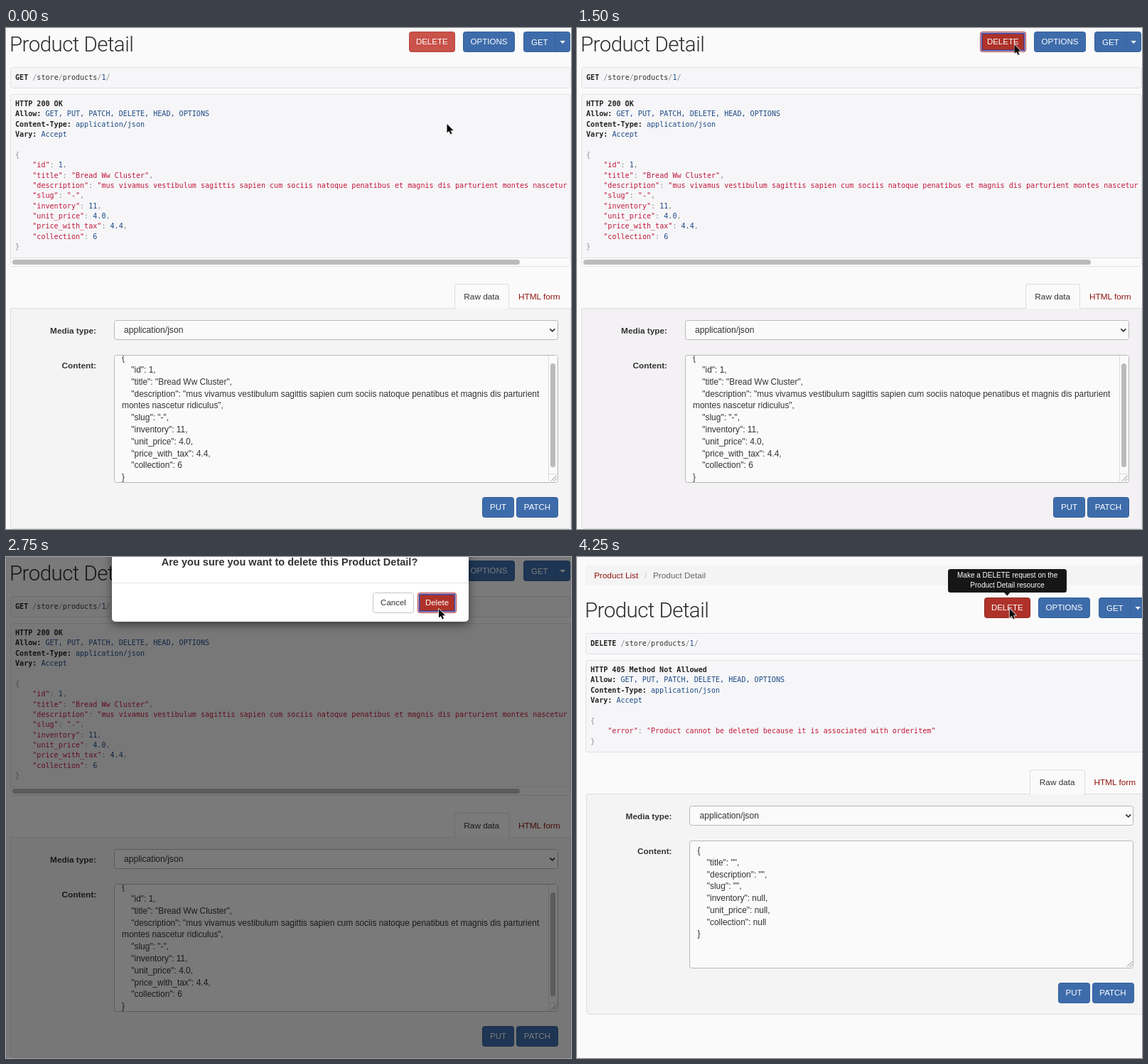
Animation of 795x705 px, one loop 5 s. Source, as an HTML page:

```html
<!DOCTYPE html>
<html lang="en">
<head>
<meta charset="utf-8">
<title>Product Detail</title>
<style>
  html, body { margin: 0; width: 100%; height: 100%; overflow: hidden; background: #fafafa; }
  #stage {
    position: relative; width: 795px; height: 705px; overflow: hidden; background: #fafafa;
    font: 11.8px "Liberation Sans", Arial, sans-serif; color: #333;
  }
  #stage div { position: absolute; box-sizing: border-box; white-space: pre; }
  #stage svg { position: absolute; left: 0; top: 0; overflow: visible; }
  .layer { left: 0; top: 0; width: 795px; height: 705px; }
  .title { font: 300 29.5px Roboto, "Liberation Sans", sans-serif; letter-spacing: -.55px; color: #2b2b2b; }
  .btn { border: 1px solid #34609b; border-radius: 3.5px; background: #3e6cab; color: #fff; font-size: 11.5px; text-align: center; }
  .red { border-color: #b5443d; background: #c9524a; }
  .hover { border-color: #8f2a22; background: #ae3229; }
  .plain { border-color: #c4c4c4; background: #fff; color: #333; }
  .pre { border: 1px solid #e0e0e6; border-radius: 3.5px; background: #f6f6f8; }
  .code { font: 10.09px/14.36px "DejaVu Sans Mono", monospace; color: #333; }
  .code b { color: #222; }
  .code i { font-style: normal; color: #8a8f90; }
  .code s { text-decoration: none; color: #c2183c; }
  .code u { text-decoration: none; color: #1f4a85; }
  .well { border: 1px solid #dedede; border-radius: 0 0 4px 4px; background: #f4f4f4; }
  .tab { border: 1px solid #ddd; border-bottom: 0; border-radius: 4px 4px 0 0; background: #fafafa; text-align: center; }
  .link { color: #8f1510; }
  .label { font-weight: bold; text-align: right; }
  .field { border: 1px solid #b8b8b8; border-radius: 3.5px; background: #fafafa; overflow: hidden; font-size: 12.1px; }
  .content { font-size: 11.95px; }
  .track { background: #fafafa; }
  .thumb { border-radius: 4px; background: #bbb; }
  .crumbs { border-radius: 3.5px; background: #f4f4f4; }
  .modal { border-radius: 5px; background: #fff; box-shadow: 0 4px 13px rgba(0,0,0,.5); }
  .question { font-size: 14.53px; font-weight: bold; text-align: center; }
  .tip { border-radius: 3.5px; background: #161616; color: #fff; font-size: 10px; text-align: center; }
</style>
</head>
<body>
<div id="stage"></div>
<script>
const LOOP = 5000;

const box = (cls, x, y, w, h, html = "", id = "") =>
  `<div class="${cls}" ${id && `id="${id}"`} style="left:${x}px;top:${y}px;width:${w}px;height:${h}px">${html}</div>`;

// One line of text, vertically centred on y.
const label = (cls, x, y, html, w = 400) =>
  `<div class="${cls}" style="left:${x}px;top:${y - 20}px;width:${w}px;line-height:40px">${html}</div>`;

const button = (cls, x, y, w, text, id) =>
  box("btn " + cls, x, y, w, 28.5, `<span style="line-height:27px">${text}</span>`, id);

const block = (cls, x, y, lineHeight, lines) =>
  `<div class="${cls}" style="left:${x}px;top:${y}px;line-height:${lineHeight}px">${lines.join("\n")}</div>`;

const paintJson = line => line.replace(/("[^"]*"?)|([\d.]+)|([{}:,])/g, (m, str, num) =>
  str ? `<s>${m}</s>` : num ? `<u>${m}</u>` : `<i>${m}</i>`);

const stroke = (d, color, width) => `<path d="${d}" fill="none" stroke="${color}" stroke-width="${width}"/>`;

function head({ verb, status, json, height, deleteId, deleteClass }) {
  const headers = [
    `<b>HTTP ${status}</b>`,
    "<b>Allow:</b> <u>GET, PUT, PATCH, DELETE, HEAD, OPTIONS</u>",
    "<b>Content-Type:</b> <u>application/json</u>",
    "<b>Vary:</b> <u>Accept</u>",
    ""
  ];
  return label("title", 5, 23, "Product Detail")
    + button(deleteClass, 567, 5, 64.5, "DELETE", deleteId)
    + button("", 643, 5, 73, "OPTIONS")
    + button("", 728, 5, 66, "")
    + label("", 739, 19.5, '<span style="color:#fff;font-size:11.5px">GET</span>')
    + `<svg>${stroke("M773 5.5V33.5", "#34609b", 1)}<path d="M779.5 18h7.4l-3.7 4z" fill="#fff"/></svg>`
    + box("pre", 6, 55, 788.5, 30)
    + block("code", 13, 62.6, 14.36, [`<b>${verb}</b> <i>/</i>store<i>/</i>products<i>/</i><u>1</u><i>/</i>`])
    + box("pre", 6, 93, 788.5, height)
    + block("code", 13, 100, 14.36, headers.concat(json.map(paintJson)));
}

function form({ wellId, textTop, text, scroll }) {
  const bar = scroll
    ? box("track", 763, 461, 12.5, 177) + box("thumb", 766, 472, 7, 146)
      + `<svg>${stroke("M763.5 461V638.5M763.5 627.5H776", "#dcdcdc", 1)}</svg>`
    : "";
  return box("well", 6, 394, 788.5, 311, "", wellId)
    + box("tab", 630.5, 359.5, 77.5, 35.5, '<span style="line-height:35px">Raw data</span>')
    + label("link", 721, 377.5, "HTML form")
    + label("label", 27, 425.5, "Media type:", 100)
    + label("label", 27, 475, "Content:", 100)
    + box("field", 151.5, 411, 625, 28, '<span style="line-height:27px;margin-left:13.5px">application/json</span>')
    + box("field", 151.5, 460, 625, 179.5, block("content", 10.5, textTop, 16.76, text))
    + bar
    + `<svg>${stroke("M765.3 423.4l3.5 3.5 3.5-3.5", "#333", 1.7)}
        ${stroke("M767 637.5l7.5-7.5M771 637.5l3.5-3.5", "#777", .9)}</svg>`
    + button("", 670, 660, 45, "PUT")
    + button("", 718, 660, 59, "PATCH");
}

const group = (x, y, html) => box("", x, y, 795, 705, html);

const lorem = "mus vivamus vestibulum sagittis sapien cum sociis natoque penatibus et magnis dis parturient";
const product = ['"slug": "-",', '"inventory": 11,', '"unit_price": 4.0,', '"price_with_tax": 4.4,', '"collection": 6'];
const indent = lines => lines.map(line => "    " + line);
const start = ["{", ...indent(['"id": 1,', '"title": "Bread Ww Cluster",', `"description": "${lorem}`])];
const rest = [...indent(product), "}"];

const detailPage =
  head({
    verb: "GET", status: "200 OK", height: 242.5, deleteId: "pageDelete", deleteClass: "red",
    json: [...start.slice(0, 3), start[3] + " montes nascetur", ...rest]
  })
  + box("track", 7, 323, 786.5, 11.5) + box("thumb", 9, 326, 714, 6.8)
  + `<svg>${stroke("M7 323.5H793.5", "#e4e4e6", 1)}</svg>`
  + form({
    wellId: "detailWell", textTop: -4.6, scroll: true,
    text: [...start, 'montes nascetur ridiculus",', ...rest]
  });

const errorPage =
  box("crumbs", 12, 11, 800, 29)
  + label("link", 24, 25.5, "Product List")
  + label("", 95, 25.5, '<span style="color:#c4c4c4">/</span>')
  + label("", 107, 25.5, '<span style="color:#666">Product Detail</span>')
  + group(6, 52, head({
    verb: "DELETE", status: "405 Method Not Allowed", height: 130, deleteId: "errorDelete", deleteClass: "hover",
    json: ["{", '    "error": "Product cannot be deleted because it is associated with orderitem"', "}"]
  }))
  + group(6.5, -61, form({
    wellId: "errorWell", textTop: 5, scroll: false,
    text: ["{", ...indent(['"title": "",', '"description": "",', '"slug": "",',
      '"inventory": null,', '"unit_price": null,', '"collection": null']), "}"]
  }))
  + box("layer", 0, 0, 795, 705,
    box("tip", 522, 17, 167, 33)
    + block("tip", 535, 19, 14.3, ["Make a DELETE request on the", "Product Detail resource"])
    + '<svg><path d="M601 50h8.4l-4.2 4.4z" fill="#161616"/></svg>', "tip");

const modal =
  box("modal", 149, -60, 502, 151)
  + label("question", 149, 6.5, "Are you sure you want to delete this Product Detail?", 500)
  + `<svg>${stroke("M149 36.5H651", "#e3e3e3", 1)}</svg>`
  + button("plain", 516, 50, 58, "Cancel")
  + button("red", 579, 50, 55, "Delete", "modalDelete");

document.getElementById("stage").innerHTML =
  `<div id="detail" class="layer">${detailPage}</div>
   <div id="error" class="layer">${errorPage}</div>
   <div id="shade" class="layer" style="background:rgba(0,0,0,.51)"></div>
   <div id="modal" class="layer">${modal}</div>
   <div id="ghost" class="layer">${button("red", 567, 5, 64.5, "DELETE")}</div>
   <svg id="cursor" width="12" height="18">
     <path d="M0 0V12.6L2.9 9.9 4.9 14.6 7 13.7 5 9.2H9Z" fill="#000" stroke="#fff" stroke-width="1.6"
       stroke-linejoin="round" paint-order="stroke"/></svg>`;

// Holds each value from its time until the next one.
function hold(id, property, steps) {
  const frames = steps.map(([time, value]) => ({ offset: time / LOOP, [property]: value, easing: "step-end" }));
  frames.push({ offset: 1, [property]: steps[steps.length - 1][1] });
  document.getElementById(id).animate(frames, { duration: LOOP, iterations: Infinity });
}

const HOVER = "#ae3229", RED = "#c9524a";
const NO_RING = "inset 0 0 0 0 transparent, inset 0 0 0 0 transparent";
const RING = "inset 0 0 0 1px #c3bce4, inset 0 0 0 2.5px #3a45a0";
const move = (x, y) => `translate(${x}px, ${y}px)`;

hold("cursor", "transform", [
  [0, move(620.5, 135)], [250, move(629, 121)], [500, move(647, 50)], [750, move(621, 28)],
  [1000, move(618, 26)], [1250, move(615.5, 23.5)], [2000, move(615.5, 26)], [2250, move(610, 69)],
  [2500, move(609, 73)], [3500, move(608.8, 72.8)]
]);
hold("detail", "visibility", [[0, "visible"], [3000, "hidden"]]);
hold("error", "visibility", [[0, "hidden"], [3000, "visible"]]);
hold("shade", "opacity", [[0, 0], [1750, 1], [3000, 0]]);
hold("modal", "opacity", [[0, 0], [1750, .77], [2000, 1], [3000, 0]]);
hold("modal", "transform", [[0, move(0, -13)], [2000, move(0, 0)]]);
hold("ghost", "opacity", [[0, 0], [1750, .18], [2000, 0]]);
hold("detailWell", "backgroundColor", [[0, "#f4f4f4"], [250, "#f3f1f3"], [1750, "#f4f4f4"]]);
hold("pageDelete", "backgroundColor", [[0, RED], [1250, HOVER]]);
hold("pageDelete", "boxShadow", [[0, NO_RING], [1500, RING]]);
hold("modalDelete", "backgroundColor", [[0, RED], [2250, HOVER]]);
hold("modalDelete", "boxShadow", [[0, NO_RING], [2750, RING]]);
hold("tip", "opacity", [[0, 0], [4000, .55], [4250, 1]]);
</script>
</body>
</html>
```
